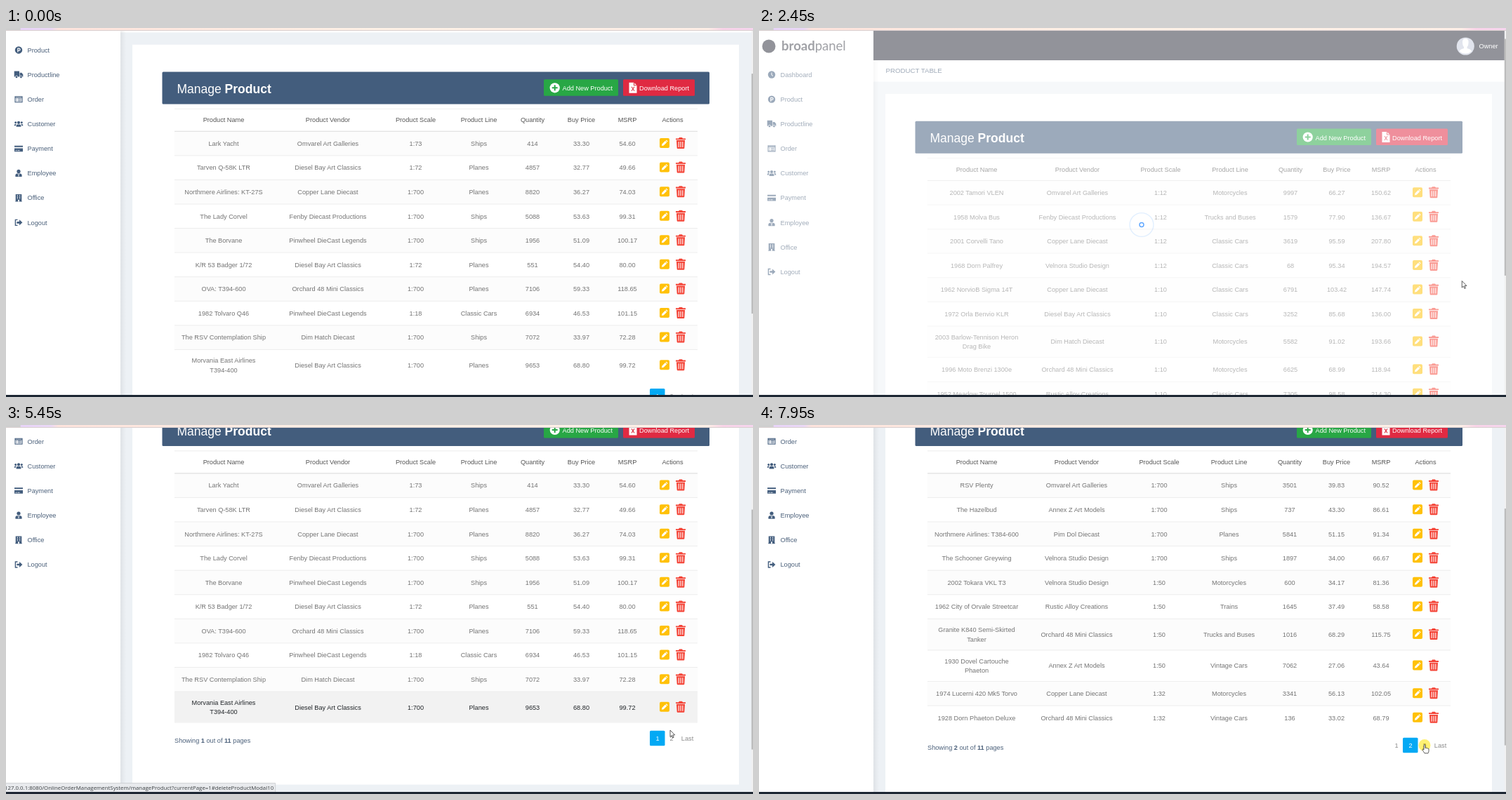
Animation of 1064x526 px, one loop 8000 ms. Source, as an HTML page:

```html
<!DOCTYPE html>
<html lang="en">
<head>
<meta charset="utf-8">
<title>Manage Product</title>
<style>
html, body { margin: 0; width: 100%; height: 100%; overflow: hidden; background: #fff; }
svg { display: block; width: 1064px; height: 526px; }
text { font: 9.2px "Liberation Sans", Arial, sans-serif; fill: #747474; }
.mid text, text.mid { text-anchor: middle; }
.head text { fill: #555; }
.back { fill: #fff; }
.odd .back { fill: #fcfcfc; }
.hot .back { fill: #f2f2f2; }
.row.hot text { fill: #212529; }
.link text { fill: #8a8a8a; }
.link.hot text { fill: #444; text-decoration: underline; }
.side text, .note { fill: #4b607a; }
.side g { fill: #435d7d; }
text.on { fill: #fff; }
.title { font-size: 17.5px; }
.crumb { font-size: 9.7px; }
.mark { font: 18.5px Lato, sans-serif; fill: #4a4c56; }
.mark tspan, .bold { font-weight: bold; }
.status { font: 7.85px "Open Sans", sans-serif; fill: #3c4043; }
</style>
</head>
<body>
<svg id="stage" viewBox="0 0 1064 526"></svg>
<script>
const LOOP = 8000, ROW = 34.57, TALL = 44.6, TOP = 217.5;

const vendors = ['Omvarel Art Galleries', 'Diesel Bay Art Classics', 'Copper Lane Diecast',
  'Fenby Diecast Productions', 'Pinwheel DieCast Legends', 'Orchard 48 Mini Classics',
  'Dim Hatch Diecast', 'Velnora Studio Design', 'Rustic Alloy Creations', 'Pim Dol Diecast',
  'Annex Z Art Models'];

// Rows: name (~ breaks the line) | vendor | scale | line | quantity | price | MSRP
const first = {
  no: 1, cols: [310, 458.5, 583.5, 673.5, 750, 819.5, 885, 949.5],
  links: [['1', 928, 1], ['2', 948], ['Last', 970.5]],
  rows: `Lark Yacht|0|1:73|Ships|414|33.30|54.60
Tarven Q-58K LTR|1|1:72|Planes|4857|32.77|49.66
Northmere Airlines: KT-27S|2|1:700|Planes|8820|36.27|74.03
The Lady Corvel|3|1:700|Ships|5088|53.63|99.31
The Borvane|4|1:700|Ships|1956|51.09|100.17
K/R 53 Badger 1/72|1|1:72|Planes|551|54.40|80.00
OVA: T394-600|5|1:700|Planes|7106|59.33|118.65
1982 Tolvaro Q46|4|1:18|Classic Cars|6934|46.53|101.15
The RSV Contemplation Ship|6|1:700|Ships|7072|33.97|72.28
Morvania East Airlines~T394-400|1|1:700|Planes|9653|68.80|99.72`
};
const last = {
  no: 11, cols: [310, 453.5, 572, 671, 757, 823, 886, 949.5],
  links: [['First', 925], ['10', 950], ['11', 973, 1]],
  rows: `2002 Tamori VLEN|0|1:12|Motorcycles|9997|66.27|150.62
1958 Molva Bus|3|1:12|Trucks and Buses|1579|77.90|136.67
2001 Corvelli Tano|2|1:12|Classic Cars|3619|95.59|207.80
1968 Dorn Palfrey|7|1:12|Classic Cars|68|95.34|194.57
1962 NorvioB Sigma 14T|2|1:10|Classic Cars|6791|103.42|147.74
1972 Orla Benvio KLR|1|1:10|Classic Cars|3252|85.68|136.00
2003 Barlow-Tennison Heron~Drag Bike|6|1:10|Motorcycles|5582|91.02|193.66
1996 Moto Brenzi 1300e|5|1:10|Motorcycles|6625|68.99|118.94
1952 Meadow Tournel 1500|8|1:10|Classic Cars|7305|98.58|214.30
1969 Barlow Tennison~Supreme Chopper|9|1:10|Motorcycles|7933|48.81|95.70`
};
const second = {
  no: 2, cols: [310, 452.5, 570, 669.5, 756, 822.5, 886, 949.5],
  links: [['1', 908], ['2', 928, 1], ['3', 948], ['Last', 970.5]],
  rows: `RSV Plenty|0|1:700|Ships|3501|39.83|90.52
The Hazelbud|10|1:700|Ships|737|43.30|86.61
Northmere Airlines: T384-600|9|1:700|Planes|5841|51.15|91.34
The Schooner Greywing|7|1:700|Ships|1897|34.00|66.67
2002 Tokara VKL T3|7|1:50|Motorcycles|600|34.17|81.36
1962 City of Orvale Streetcar|8|1:50|Trains|1645|37.49|58.58
Granite K840 Semi-Skirted~Tanker|5|1:50|Trucks and Buses|1016|68.29|115.75
1930 Dovel Cartouche~Phaeton|10|1:50|Vintage Cars|7062|27.06|43.64
1974 Lucerni 420 Mk5 Torvo|2|1:32|Motorcycles|3341|56.13|102.05
1928 Dorn Phaeton Deluxe|5|1:32|Vintage Cars|136|33.02|68.79`
};
const pages = [first, last, second];

const text = (x, y, s, cls = '') => `<text x="${x}" y="${y}" dy=".35em" class="${cls}">${s}</text>`;
const rect = (x, y, w, h, fill, more = '') =>
  `<rect x="${x}" y="${y}" width="${w}" height="${h}" fill="${fill}" ${more}/>`;
const rule = (y, c = '#e9e9e9') => `<path d="M240 ${y}H985" stroke="${c}" stroke-width=".8"/>`;
const at = (x, y, s) => `<g transform="translate(${x} ${y})">${s}</g>`;

const pencil = rect(-7, -7, 14, 14, '#ffc107', 'rx="2"') +
  '<path d="M-4 4l.5-2.7L1-3.2 3.2-1l-4.5 4.5zM1.6-3.8l.9-.8 2.2 2.2-.9.8z" fill="#fff"/>';
const trash = '<path d="M-7-6.6h4l1-1.4h4l1 1.4h4v1.9H-7zM-6-3.9H6L5.3 7.2Q5.2 8 4.4 8h-8.8q-.8 0-.9-.8z" fill="#f44336"/>' +
  '<path d="M-2.8-2V6M0-2V6M2.8-2V6" stroke="#fff" stroke-width="1.1"/>';

const menu = [
  ['Dashboard', '<circle r="5.2"/><path d="M0-3V.5L2 2" fill="none" stroke="#fff"/>'],
  ['Product', '<circle r="5.2"/><path d="M-1.2 3V-2.3H.6a1.5 1.5 0 0 1 0 3H-1" fill="none" stroke="#fff" stroke-width="1.2"/>'],
  ['Productline', '<path d="M-6.3-5H1v8h-7.3zM1.6-2.8h2.6L6.3-.3V3H1.6z"/><g stroke="#fff" stroke-width=".7"><circle cx="-3" cy="3.3" r="1.8"/><circle cx="3.4" cy="3.3" r="1.8"/></g>'],
  ['Order', '<path d="M-5-4H5V4H-5zM-5-2.4H5M-3.4-.4h1.2M-1-.4h4.6M-3.4 2h1.2M-1 2h4.6" fill="none" stroke="#435d7d" stroke-width="1.1"/>'],
  ['Customer', '<circle cy="-2" r="2.1"/><circle cx="-4.3" cy="-2" r="1.5"/><circle cx="4.3" cy="-2" r="1.5"/><path d="M-3.4 4V2.4Q-3.4.6-1.6.6h3.2q1.8 0 1.8 1.8V4zM-6.4 2.4Q-6.4.1-4.6.1h1.3Q-4.2 1-4.2 2.4zM6.4 2.4Q6.4.1 4.6.1H3.3Q4.2 1 4.2 2.4z"/>'],
  ['Payment', '<path d="M-6-4.3H6v2H-6zM-6-.5H6v4.8H-6z"/><path d="M-4.5 2.7h2M-1.5 2.7h3" stroke="#fff" stroke-width=".8"/>'],
  ['Employee', '<circle cy="-2.7" r="2.6"/><path d="M-4.6 5V3Q-4.6.5-2 .5h4Q4.6.5 4.6 3v2z"/><path d="M-1 .6L0 4.4 1 .6" fill="none" stroke="#fff" stroke-width=".6"/>'],
  ['Office', '<path d="M-4.3-5.3h8.6v9.8h.5v.9h-9.6v-.9h.5z"/><path d="M-1.6-4V1.4M1.6-4V1.4" stroke="#fff" stroke-width="1.3" stroke-dasharray="1.3 .9"/>' + rect(-.9, 2.6, 1.8, 2.8, '#fff')],
  ['Logout', '<path d="M-1.5-4H-4.6V4h3.1" fill="none" stroke="#435d7d" stroke-width="1.4"/><path d="M-2.6-1.3H1V-4L5.4 0 1 4V1.3h-3.6z"/>']
];

function pageMarkup(p) {
  const heads = ['Product Name', 'Product Vendor', 'Product Scale', 'Product Line', 'Quantity', 'Buy Price', 'MSRP', 'Actions'];
  let y = TOP, out = '';
  p.spans = [];
  p.rows.split('\n').forEach((line, i) => {
    const cells = line.split('|'), name = cells[0].split('~');
    const h = name.length > 1 ? TALL : ROW, cy = y + h / 2;
    cells[1] = vendors[cells[1]];
    out += `<g class="row mid ${i % 2 ? '' : 'odd'}">` + rect(240, y, 745, h, '', 'class="back"') +
      name.map((s, k) => text(310, cy + (k - (name.length - 1) / 2) * 13.6, s)).join('') +
      cells.slice(1).map((s, k) => text(p.cols[k + 1], cy, s)).join('') +
      rule(y) + at(938, cy - .6, pencil) + at(961, cy - .6, trash) + '</g>';
    p.spans.push([y, y += h]);
  });
  p.end = y;
  p.height = y + 168;
  const links = p.links.map(([s, x, on]) => on
    ? rect(x - 11, y + 11, 21.5, 21.5, '#03a9f4', 'rx="1.5"') + text(x, y + 22, s, 'mid on')
    : `<g class="link mid" data-x="${x}">${text(x, y + 22, s)}</g>`).join('');
  return `<g class="page">${rect(180, 94, 864, y - 6, '#fff')}
    ${rect(222.5, 132.7, 779.5, 46, '#435d7d', 'rx="1.5"')}
    ${text(243.5, 157, 'Manage <tspan class="bold">Product</tspan>', 'title on')}
    ${rect(766, 143.5, 106, 23.5, '#28a745', 'rx="1.5"')}${rect(879, 143.5, 102, 23.5, '#e02a42', 'rx="1.5"')}
    <circle cx="781.7" cy="155.5" r="7.1" fill="#fff"/>
    <path d="M777.7 155.5h8M781.7 151.5v8" stroke="#28a745" stroke-width="2"/>
    <path d="M887.5 148h7l4 4v11h-11z" fill="#fff"/>
    <path d="M894.5 148v4h4M891 154l4 6M895 154l-4 6" fill="none" stroke="#dc3545" stroke-width="1.1"/>
    ${text(792.5, 156.3, 'Add New Product', 'on')}${text(902, 156.3, 'Download Report', 'on')}
    ${rule(185.5)}<g class="head mid">${heads.map((s, i) => text(p.cols[i], 201.3, s)).join('')}</g>
    ${out}${rule(TOP, '#dcdcdc')}
    ${text(240, y + 25.5, `Showing <tspan class="bold">${p.no}</tspan> out of <tspan class="bold">11</tspan> pages`, 'note')}
    ${links}${rect(163, y + 127, 901, 60, '#fff')}
    ${text(612, y + 148.5, '2020 © Broad Panel brought to you by <tspan fill="#2b7bb9">foldraster.com</tspan>', 'mid note')}</g>`;
}

const stage = document.getElementById('stage');
stage.innerHTML = `<defs>
  <linearGradient id="shade"><stop stop-color="#000" stop-opacity=".06"/><stop offset="1" stop-color="#000" stop-opacity="0"/></linearGradient>
  <linearGradient id="tabs"><stop stop-color="#cfcfcf"/><stop offset=".019" stop-color="#cfcfcf"/><stop offset=".02" stop-color="#e8d4f8"/>
    <stop offset=".06" stop-color="#ead8f6"/><stop offset=".07" stop-color="#fde3dc"/><stop offset=".5" stop-color="#fdf1e6"/>
    <stop offset=".94" stop-color="#fdeee6"/><stop offset=".96" stop-color="#f8d3e8"/><stop offset="1" stop-color="#f5d5ee"/></linearGradient></defs>
  ${rect(0, 0, 1064, 526, '#edf1f5')}
  <g id="doc">
    ${rect(163, 4, 901, 42, '#2f323e')}${rect(163, 46, 901, 30.5, '#fff')}
    <circle cx="1006.3" cy="26" r="12.6" fill="#c5cbdc"/>
    <path d="M1002 20q0-5 4.3-5t4.3 5q0 5-2 7v2q5 1 6.5 4a12.6 12.6 0 0 1-17.6 0q1.5-3 6.5-4v-2q-2-2-2-7z" fill="#fff"/>
    ${text(1025.5, 25.5, 'Owner', 'on')}
    ${text(180.5, 61, 'PRODUCT TABLE', 'note crumb')}
    ${pages.map(pageMarkup).join('')}
    ${rect(0, 0, 163, 900, '#fff')}${rect(163, 46, 8, 860, 'url(#shade)')}
    <circle cx="14" cy="26" r="9.5" fill="#2f323e"/>
    <text x="32" y="31.5" class="mark"><tspan>broad</tspan>panel</text>
    <g class="side">${menu.map(([s, icon], i) => at(18, 66.5 + i * 35.13, icon) + text(30.5, 66.5 + i * 35.13, s)).join('')}</g>
  </g>
  <g id="veil">${rect(0, 0, 1064, 526, '#fff')}</g>
  <g id="rings" fill="none" stroke="#137eff" stroke-width="1.4"><circle cx="545" cy="280.5"/><circle cx="545" cy="280.5"/></g>
  ${rect(1061.8, 4, 2.2, 519, '#f1f1f1')}<rect id="thumb" x="1061.8" width="2.2" fill="#bdbdbd"/>
  <g id="status"><path id="plate" fill="#e8eaed" stroke="#c4c7cb" stroke-width=".7"/>${text(-2, 517, '', 'status')}</g>
  ${rect(0, 0, 1064, 4, 'url(#tabs)')}${rect(0, 3, 1064, 1, '#d9cfcf')}${rect(0, 523, 1064, 3, '#1d2733')}
  <circle id="spot" r="8.5" fill="#ffe600" opacity=".55"/>
  <g id="cursor" fill="#fff" stroke="#333" stroke-width=".8" stroke-linejoin="round">
    <path d="M0 0V9.5L2.2 7.5 3.7 10.9 5.2 10.2 3.7 6.9H6.7z"/>
    <path d="M-1 .6Q0-.6 1 .6V5q1-.8 1.8.2 1-.6 1.7.4 1.3-.4 1.5.8v2.8q0 1.4-1 3.2H0Q-1.5 9.8-3.2 7.6-3.2 6-1 7.4z"/></g>`;

const $ = id => document.getElementById(id);
const views = [...stage.querySelectorAll('.page')];
const url = '127.0.0.1:8080/OnlineOrderManagementSystem/manageProduct?currentPage=';

// Page loads: [shown at, page index, veil starts to fade, veil gone]
const loads = [[0, 0, -2, -1], [2000, 1, 2250, 2640], [4150, 0, 4486, 4886], [5950, 2, 6300, 6690]];
const scrolls = [[0, 70.2], [70, 70.2], [430, 218.5], [1999, 218.5], [2000, 0], [2930, 0], [3040, 149.3], [4149, 149.3],
  [4150, 0], [5000, 0], [5220, 148.6], [5949, 148.6], [5950, 0], [7080, 0], [7400, 148.6]];
const moves = [[600, 985, 535], [950, 978, 470], [1350, 978.5, 373.5], [1900, 978.5, 373.5], [2600, 1004, 359],
  [3040, 1004, 359], [3700, 925, 455], [4150, 925, 455], [4600, 963, 366], [5150, 963, 366], [5380, 950, 410],
  [5450, 946, 435], [5600, 948, 446], [5900, 948, 446], [6900, 960, 386], [7250, 960, 386], [7900, 948, 455.5]];
const hints = [[1300, 2000, '11'], [3780, 4150, '1'], [5350, 5540, '1#deleteProductModal10'], [5540, 5950, '2']];
const clicks = [1780, 3850, 5640, 7930];

const swing = x => .5 - Math.cos(Math.PI * Math.min(1, Math.max(0, x))) / 2;
function track(keys, t) {
  const i = keys.findIndex(k => k[0] > t);
  if (i === 0) return keys[0].slice(1);
  if (i < 0) return keys[keys.length - 1].slice(1);
  const a = keys[i - 1], b = keys[i], e = swing((t - a[0]) / (b[0] - a[0]));
  return a.slice(1).map((v, k) => v + (b[k + 1] - v) * e);
}
const set = (el, attrs) => { for (const k in attrs) el.setAttribute(k, attrs[k]); };
const show = (el, on) => { el.style.display = on ? '' : 'none'; };

function draw(t) {
  const [, index, fade, gone] = loads.filter(l => l[0] <= t).pop();
  const page = pages[index], [y] = track(scrolls, t), [cx, cy] = track(moves, t);
  const veil = 1 - swing((t - fade) / (gone - fade)), clear = veil === 0;
  set($('doc'), { transform: `translate(0 ${-y})` });
  views.forEach((v, i) => show(v, i === index));

  // Row highlight trails the pointer slightly.
  const [hx, hy] = track(moves, t - 100);
  views[index].querySelectorAll('.row').forEach((row, i) => {
    const [a, b] = page.spans[i];
    row.classList.toggle('hot', clear && hx > 240 && hx < 985 && hy + y >= a && hy + y < b);
  });
  let hand = false;
  views[index].querySelectorAll('.link').forEach(link => {
    const hot = clear && Math.abs(cx - link.dataset.x) < 10 && Math.abs(cy + y - page.end - 22) < 9;
    link.classList.toggle('hot', hot);
    hand = hand || hot;
  });

  set($('veil'), { opacity: veil });
  [...$('rings').children].forEach((ring, i) => {
    const x = ((t - 4660) / 1000 + 8.28 + i / 2) % 1, p = 1 - (1 - x) ** 2.2;
    set(ring, { r: 20 * p, opacity: (1 - p) * Math.min(1, veil * 1.7) });
  });
  const ratio = first.height / page.height;
  set($('thumb'), { y: 15.5 + y * .707 * ratio, height: 342 * ratio });

  const hint = hints.find(h => t >= h[0] && t < h[1]);
  show($('status'), hint);
  if (hint) {
    const label = $('status').lastChild;
    label.textContent = url + hint[2];
    set($('plate'), { d: `M-1 510.5H${label.getComputedTextLength() + .5}V524H-1z` });
  }
  show($('spot'), clicks.some(c => t >= c && t < c + 250));
  set($('spot'), { cx, cy: cy + 1 });
  set($('cursor'), { transform: `translate(${cx} ${cy})` });
  show($('cursor').children[0], !hand);
  show($('cursor').children[1], hand);
}

const start = performance.now();
function tick() {
  draw((performance.now() - start) % LOOP);
  requestAnimationFrame(tick);
}
tick();
</script>
</body>
</html>
```
